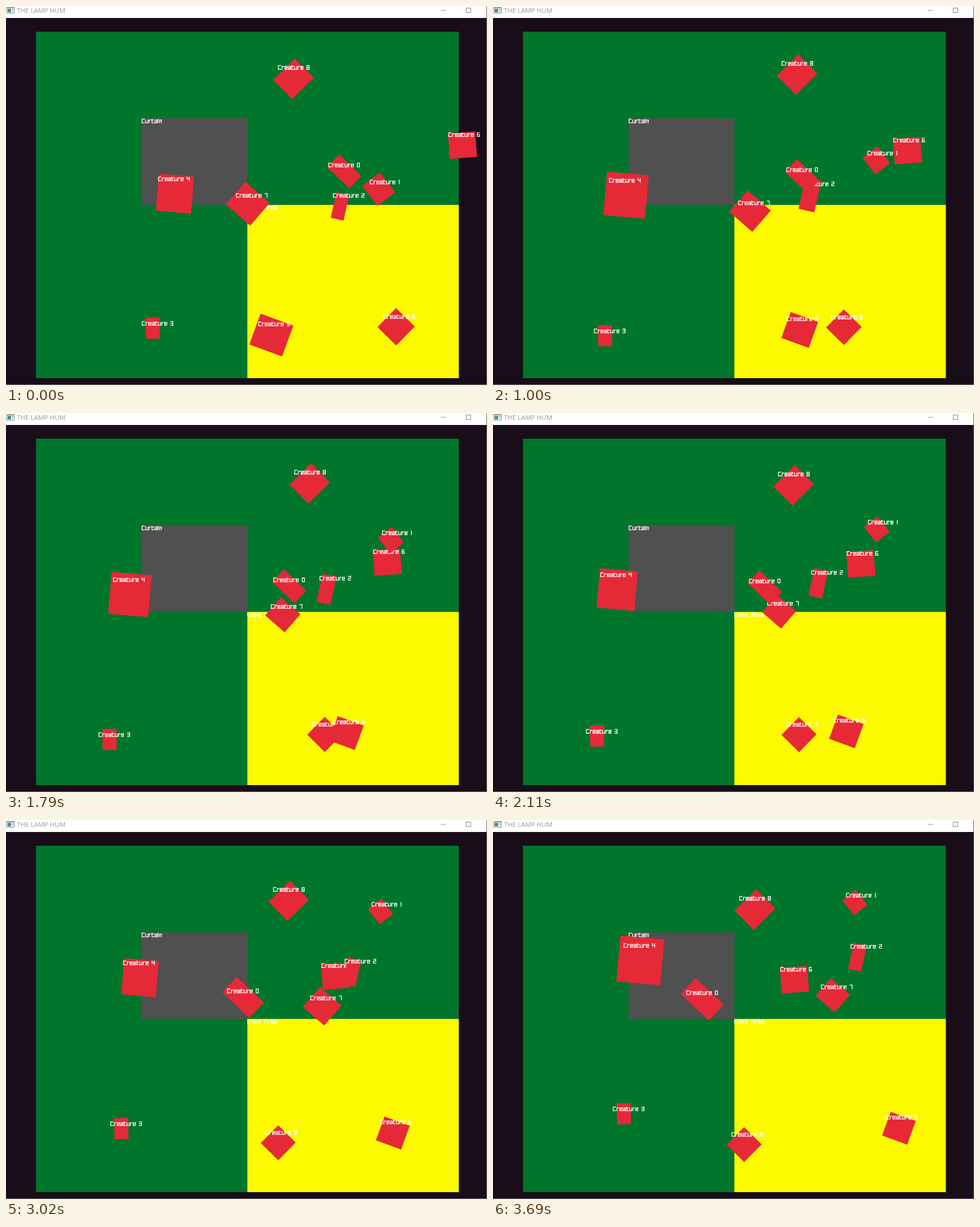
These frames come from a looping animation (844x664 px, 3.79 s). An HTML page with a canvas:

```html
<!DOCTYPE html>
<html lang="en">
<head>
<meta charset="utf-8">
<title>THE LAMP HUM</title>
<style>
  html, body { margin: 0; width: 100%; height: 100%; overflow: hidden; background: #180d18; }
  canvas { display: block; width: 844px; height: 664px; }
</style>
</head>
<body>
<canvas id="stage" width="844" height="664"></canvas>
<script>
const ctx = document.getElementById('stage').getContext('2d');
const LOOP = 3790, TRAVEL = 3690;
const FIELD = { x: 52.5, y: 45, w: 742, h: 607 };
const CENTER = { x: FIELD.x + FIELD.w / 2, y: FIELD.y + FIELD.h / 2 };
const CURTAIN = { x: FIELD.x + FIELD.w / 4, y: FIELD.y + FIELD.h / 4, w: FIELD.w / 4, h: FIELD.h / 4 };
const LIGHT = { x: CENTER.x, y: CENTER.y, w: FIELD.w / 2, h: FIELD.h / 2 };

// Square lettering, with strokes named like those of a seven-segment display.
const STROKES = {
  C: 'adef', L: 'def', A: 'abcefg',
  r: 'aef', e: 'abdefg', a: 'abcdeg', u: 'bcdef', n: 'abcef', g: 'abcdfg', t: 'defg', h: 'cefg', i: 'ef', ' ': '',
  0: 'abcdef', 1: 'bc', 2: 'abged', 3: 'abgcd', 4: 'fgbc', 5: 'afgcd', 6: 'afgecd', 7: 'abc', 8: 'abcdefg', 9: 'abcfgd'
};
const ADVANCE = { C: 6.5, r: 5, t: 5, n: 5, i: 2.5, ' ': 4.5, 1: 3 };

function drawLabel(text, x, y) {
  ctx.strokeStyle = '#fff';
  ctx.lineWidth = 1.3;
  ctx.lineCap = 'square';
  ctx.beginPath();
  const bottom = y + 3.2;
  for (const char of text) {
    const advance = ADVANCE[char] ?? 6;
    const top = bottom - ('reaung'.includes(char) ? 5 : 6.6);
    const left = x + 0.7, right = x + advance - 1.4;
    const middle = char === 't' ? bottom - 5 : (top + bottom) / 2;
    const ends = {
      a: [left, top, right, top], b: [right, top, right, middle], c: [right, middle, right, bottom],
      d: [left, bottom, right, bottom], e: [left, middle, left, bottom], f: [left, top, left, middle],
      g: [left, middle, right, middle]
    };
    for (const name of STROKES[char]) {
      const [x1, y1, x2, y2] = ends[name];
      ctx.moveTo(x1, y1);
      ctx.lineTo(x2, y2);
    }
    x += advance;
  }
  ctx.stroke();
}

// Polynomial through points that are evenly spaced in time.
function follow(points, t) {
  const s = t / TRAVEL * (points.length - 1);
  const position = { x: 0, y: 0 };
  points.forEach(([x, y], i) => {
    let weight = 1;
    points.forEach((_, j) => { if (j !== i) weight *= (s - j) / (i - j); });
    position.x += x * weight;
    position.y += y * weight;
  });
  return position;
}

const inside = (zone, p) => p.x > zone.x && p.x < zone.x + zone.w && p.y > zone.y && p.y < zone.y + zone.h;
const zoneAt = p => [CURTAIN, LIGHT].find(zone => inside(zone, p));

// A creature swells quickly after it changes zones, then relaxes.
function swell(age) {
  const rise = 140;
  if (age < 0) return 0;
  return 0.5 * (age < rise ? age / rise : Math.exp((rise - age) / 860));
}

class Creature {
  constructor(w, h, degrees, points, lastSwell = -Infinity) {
    Object.assign(this, { w, h, points, angle: degrees * Math.PI / 180, swells: [lastSwell] });
    const step = 10, delay = 40;
    for (let t = step; t <= TRAVEL; t += step) {
      if (zoneAt(follow(points, t)) !== zoneAt(follow(points, t - step))) this.swells.push(t + delay);
    }
  }

  draw(name, t) {
    const { x, y } = follow(this.points, t);
    const scale = this.swells.reduce((sum, start) => sum + swell(t - start), 1);
    ctx.save();
    ctx.translate(x, y);
    ctx.rotate(this.angle);
    ctx.scale(scale, scale);
    box('#e62937', -this.w / 2, -this.h / 2, this.w, this.h);
    ctx.restore();
    drawLabel(name, x - this.w / 2 - 0.8, y - this.h / 2 + 4);
  }
}

const creatures = [
  new Creature(54, 30.5, 43.5, [[593.5, 290], [493.5, 304], [367, 314]]),
  new Creature(29.5, 33.3, -38, [[654, 321], [674.5, 256.8], [669, 185], [635, 144.5]], -520),
  new Creature(23, 46, 12.5, [[586, 351], [555.6, 324.8], [582.7, 286.6], [639.5, 240.5]]),
  new Creature(37, 24.5, 89, [[257.5, 564.5], [189.5, 577.3], [187.4, 557.7], [229.6, 514.5]]),
  new Creature(57.5, 60, 5, [[296.5, 329], [226, 328.9], [222, 298], [258.5, 246]], -1716),
  new Creature(44, 46.7, -70, [[465.5, 576.5], [555.5, 565.5], [644, 554.4], [712.3, 540]], -551),
  new Creature(48, 44.7, -4.5, [[801, 243.8], [529, 280]]),
  new Creature(40, 37, 41, [[424.3, 346.5], [460, 359], [521.5, 340.7], [596.3, 307]], -300),
  new Creature(53, 47.4, -44.5, [[504.5, 127.5], [535.5, 120.5], [518, 131.5], [459.5, 157]]),
  new Creature(43, 43.5, 44.5, [[684.5, 562], [599.2, 562.9], [513.2, 564], [440.7, 568.7]], -1830)
];

function box(color, x, y, w, h) {
  ctx.fillStyle = color;
  ctx.fillRect(x, y, w, h);
}

function drawZone(color, { x, y, w, h }, name) {
  box(color, x, y, w, h);
  if (name) drawLabel(name, x, y + 4.7);
}

function drawWindow() {
  box('#666', 0, 0, 844, 664);
  box('#180d18', 0, 0, 843, 663);
  box('#fff', 0, 0, 843, 21);
  box('#8a8a8a', 1, 2, 14, 11);
  box('#f4f4f4', 2, 4, 12, 8);
  box('#3f8f8c', 3, 5, 6, 6);
  box('#a9b8c4', 11, 5, 2, 4);
  ctx.fillStyle = '#999';
  ctx.font = '11.5px "Open Sans", sans-serif';
  ctx.fillText(document.title, 19, 12);
  box('#999', 763, 7, 9, 1);
  ctx.strokeStyle = '#888';
  ctx.lineWidth = 1;
  ctx.strokeRect(807.5, 3.5, 8, 8);
}

let startTime;
function frame(now) {
  startTime ??= now;
  const t = Math.min((now - startTime) % LOOP, TRAVEL);
  drawWindow();
  drawZone('#00752c', FIELD);
  drawZone('#505050', CURTAIN, 'Curtain');
  drawZone('#fdf900', LIGHT, 'Light Area');
  for (let i = creatures.length - 1; i >= 0; i--) creatures[i].draw('Creature ' + i, t);
  requestAnimationFrame(frame);
}
requestAnimationFrame(frame);
</script>
</body>
</html>
```
